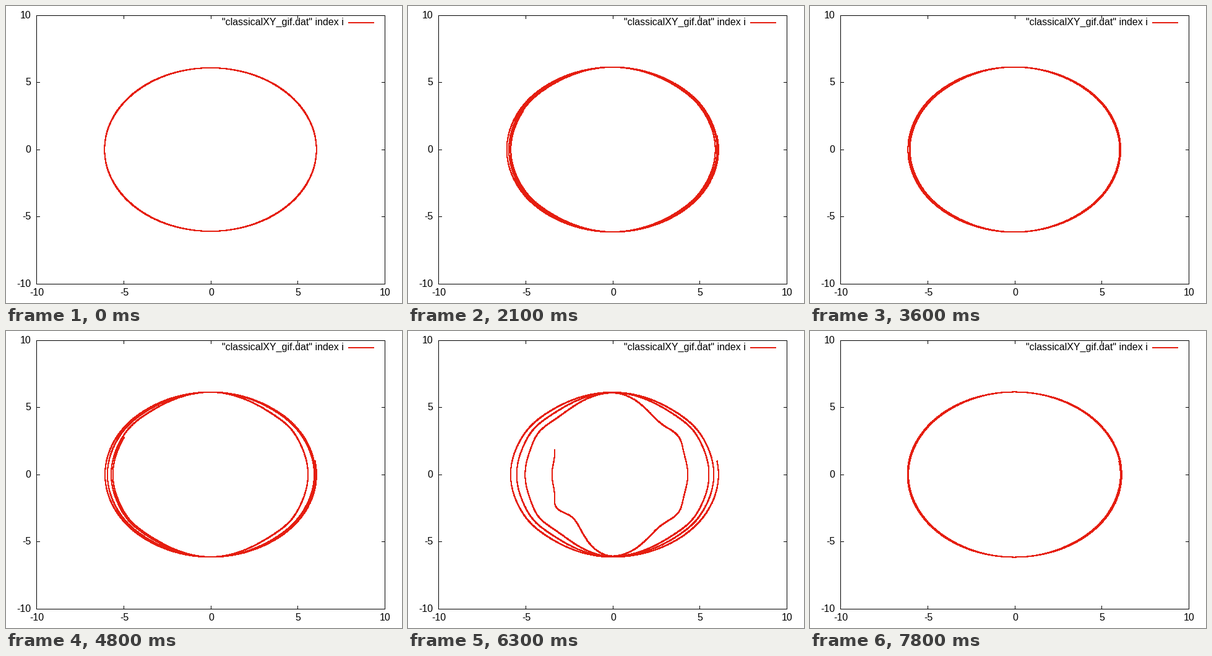
These frames come from a looping animation (640 px wide and 480 px high, 8 s). A matplotlib script:

```python
import numpy as np
import matplotlib.pyplot as plt
from matplotlib.animation import FuncAnimation

W, H, DPI = 640, 480, 100
PX = 72 / DPI
RED = "#e51e10"
LEFT, RIGHT, TOP, BOTTOM = 49, 612, 15, 449
STEP_MS, TICK_MS, TICKS = 300, 100, 80

plt.rcParams["font.family"] = "Liberation Sans"
plt.rcParams["path.simplify"] = False

# Clockwise turn from the point (6, 1), split into half turns between the poles
START_RADIUS = np.hypot(6, 1)
TURN = np.linspace(-np.arctan2(1, 6), 7 * np.pi + np.radians(29.5), 6000)
HALF = np.clip(np.round(TURN / np.pi), 0, 7)
OFF_AXIS = np.abs(TURN - HALF * np.pi)
PROGRESS = np.linspace(0, 1, TURN.size)

# Strength of the steady shrinking and of the sudden dent at a few steps
KEY_STEPS = [0, 5, 7, 12, 16, 21, 26]
DRIFT = [0, 0, 0.25, 0.1, 0.3, 1, 0]
SURGE = [0, 0.46, 0, 0, 0.27, 1.45, 0]


def to_px(x, y):
    """Whole pixel column and row of a data point."""
    col = LEFT + np.floor((x + 10) * (RIGHT - LEFT) / 20 + 0.5)
    row = BOTTOM - np.floor((y + 10) * (BOTTOM - TOP) / 20 + 0.5)
    return col, row


def orbit(step):
    drift = np.interp(step, KEY_STEPS, DRIFT)
    surge = np.interp(step, KEY_STEPS, SURGE)
    peak = 3.75 + 0.15 * step
    swell = 0.07 * (1 - np.exp(-step / 2))
    pole = START_RADIUS + swell - 0.1 * drift * PROGRESS

    # Loss of amplitude on the x axis in each half turn
    dip = (swell * np.cos(1.2 * HALF) ** 2
           + drift * (0.14 * HALF + 0.15 * (HALF % 2))
           + surge * np.exp(-((HALF - peak) / 1.3) ** 2))

    # The dent fades smoothly at the poles and has a notch near 38 degrees
    rise = 1 - np.exp(-(np.cos(OFF_AXIS) / (0.55 - 0.05 * dip)) ** 2)
    notch = np.exp(-((np.degrees(OFF_AXIS) - 38) / 13) ** 2)
    r = pole - dip * rise * (1 - 0.2 * notch)
    return to_px(r * np.cos(TURN), -r * np.sin(TURN))


fig = plt.figure(figsize=(W / DPI, H / DPI), dpi=DPI, facecolor="white")
ax = fig.add_axes([0, 0, 1, 1])
ax.set(xlim=(0, W), ylim=(H, 0))
ax.axis("off")


def stroke(xs, ys, color, width):
    return ax.plot(xs, ys, color=color, lw=width * PX, antialiased=False,
                   snap=False, solid_capstyle="butt",
                   solid_joinstyle="round")[0]


def hairline(x0, y0, x1, y1):
    """One pixel wide line through the centres of its pixels."""
    stroke([x0 + 0.5, x1 + 0.5], [y0 + 0.5, y1 + 0.5], "black", 1)


def label(x, y, text, align):
    ax.text(x, y, text, ha=align, va="baseline", fontsize=16 * PX)


curve = stroke([], [], RED, 2)

for x in (LEFT, RIGHT):
    hairline(x, TOP - 0.5, x, BOTTOM + 0.5)
for y in (TOP, BOTTOM):
    hairline(LEFT - 0.5, y, RIGHT + 0.5, y)

for v in range(-10, 11, 5):
    x, y = to_px(v, v)
    for edge, inward in ((LEFT, 5), (RIGHT, -5)):
        hairline(edge, y, edge + inward, y)
    for edge, inward in ((TOP, 5), (BOTTOM, -5)):
        hairline(x, edge, x, edge + inward)
    label(40.5, y + 5, str(v), "right")
    label(x + 1, 468, str(v), "center")

label(546, 31, '"classicalXY_gif.dat" index i', "right")
stroke([553, 595], [27, 27], RED, 2)


def update(tick):
    curve.set_data(*orbit(tick * TICK_MS // STEP_MS))
    return curve,


anim = FuncAnimation(fig, update, frames=TICKS, interval=TICK_MS,
                     repeat=True, repeat_delay=0)
plt.show()
```
